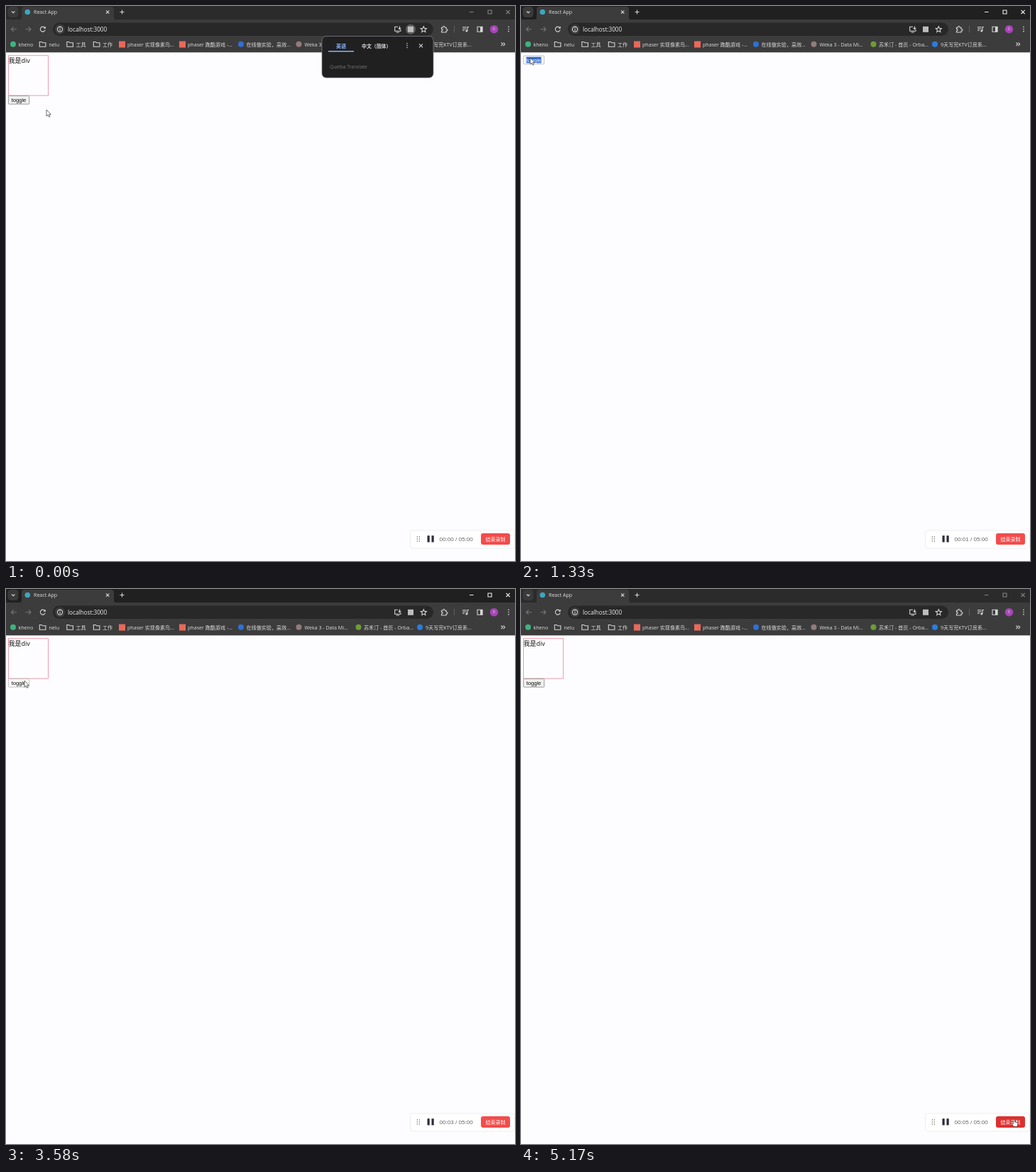
Recreate the animation shown at these times as an HTML page. Size 717 by 781 pixels, loop 5.26 s.

```html
<!DOCTYPE html>
<html lang="zh">
<head>
<meta charset="utf-8">
<title>React App</title>
<style>
  html, body { margin: 0; width: 100%; height: 100%; overflow: hidden; background: #fdfdff; }
  svg { display: block; width: 717px; height: 781px; }
  text { font: 7.1px "Open Sans", "Noto Sans CJK SC", "Noto Sans CJK", sans-serif; fill: #dedede; white-space: pre; }
  .line { fill: none; stroke: #d4d4d4; stroke-width: 1.1; }
  .dim { stroke: #777; }
  .arial { font-family: "Liberation Sans", Arial, sans-serif; }
</style>
</head>
<body>
<svg viewBox="0 0 717 781">
  <!-- tab strip -->
  <rect id="strip" width="717" height="20"/>
  <rect x="2.5" y="1" width="15" height="15" rx="4.5" fill="#3a3a3b"/>
  <path class="line" d="M8 7.5l2.2 2.2 2.2-2.2"/>
  <path d="M18 19.5q4 0 4-4V5q0-4 4-4h122q4 0 4 4v10.500q0 4 4 4z" fill="#3c3c3d"/>
  <circle cx="30.300" cy="8.500" r="3.800" fill="#3fa5bd"/>
  <text x="39" y="11">React App</text>
  <path class="line" d="M141 6.300l4.400 4.400m0-4.400l-4.400 4.400M160.500 8.500h6m-3-3v6"/>
  <path id="winButtons" class="line" d="M653 8.500h5.500M679 6h5v5h-5zM704.500 5.800l5.200 5.200m0-5.200l-5.200 5.200"/>

  <!-- toolbar -->
  <rect y="19" width="717" height="46.300" fill="#3c3c3d"/>
  <path class="line dim" d="M15 32.700H7.500m3.200-3.200l-3.200 3.200 3.200 3.200M27.500 32.700H35m-3.200-3.200l3.200 3.200-3.200 3.200"/>
  <path class="line" d="M54.600 30.400a3.500 3.500 0 1 0 .6 3.300M55.300 29v2.300H53"/>
  <rect x="66" y="23.500" width="536" height="18.500" rx="9.250" fill="#282829"/>
  <circle cx="76" cy="32.700" r="7" fill="#3c3c3d"/>
  <circle class="line" cx="76" cy="32.700" r="3.600"/>
  <path class="line" d="M76 32.200v2.600M76 30.300v1"/>
  <text x="87" y="35.700" style="font-size:8.200px;fill:#eee">localhost:3000</text>
  <path class="line" d="M552 29.300h-4.300v6h8.300v-2M549.500 37h4.500M554.500 28.500v4m-1.800-1.700l1.800 1.800 1.800-1.800"/>
  <circle id="halo" cx="570" cy="32.800" r="7" fill="#5d5d5e"/>
  <rect x="566" y="28.800" width="8" height="8" fill="#bdbdbd"/>
  <path class="line" d="M588.300 28.700l1.200 2.700 2.900.3-2.200 2 .6 2.900-2.500-1.500-2.500 1.500.6-2.900-2.200-2 2.900-.3z"/>
  <path class="line" d="M613.500 30.300h2q0-2 1.300-2t1.300 2h2v2.200q2 0 2 1.300t-2 1.300v1.900h-6.600v-2q1.700-.2 1.700-1.300t-1.700-1.300z"/>
  <path d="M631.500 28v9.500" stroke="#606062"/>
  <path class="line" d="M643 29.700h5.500M643 32h5.500M643 34.300h3M650 35v-5.500h2"/>
  <circle cx="648.800" cy="35" r="1.500" fill="#d4d4d4"/>
  <path class="line" d="M664 29.200h7v7h-7z"/>
  <path d="M668 29h3.300v7.500H668z" fill="#d4d4d4"/>
  <circle cx="687.500" cy="32.700" r="5.800" fill="#a844b8"/>
  <text x="687.500" y="34.400" text-anchor="middle" style="font-size:4.800px">D</text>
  <path d="M708 29.300v8" stroke="#d4d4d4" stroke-width="1.700" stroke-dasharray="0 3.200" stroke-linecap="round"/>
  <g id="bookmarks"></g>
  <path class="line" d="M697.500 51.500l2.200 2.300-2.200 2.300m3-4.600l2.200 2.300-2.200 2.300"/>

  <!-- page -->
  <g id="box">
    <rect x="3.500" y="69.700" width="56" height="56.300" fill="none" stroke="#ea93a3" stroke-width=".9"/>
    <text x="3.500" y="79.800" style="font-size:9px;fill:#111">我是div</text>
  </g>
  <g id="toggle">
    <rect id="face" x="3.400" y="70" width="29.300" height="11.800" rx="1.200" stroke-width=".8"/>
    <rect id="mark" x="7.500" y="71.700" width="21" height="8.600" fill="#2e68cf"/>
    <text id="label" class="arial" x="18" y="78.500" text-anchor="middle" style="font-size:7.600px">toggle</text>
  </g>

  <!-- translate bubble -->
  <g id="bubble">
    <rect x="445" y="42.500" width="157" height="58.500" rx="6" fill="#202021" stroke="#8d8798" stroke-width=".7"/>
    <text x="465" y="58.700" style="fill:#8ab4f8;font-weight:bold">英语</text>
    <text x="501" y="58.700" style="font-size:6.900px;font-weight:bold">中文（简体）</text>
    <path d="M454 63.700h36" stroke="#8ab4f8" stroke-width="1.400"/>
    <path d="M565 52.700v7" stroke="#d4d4d4" stroke-width="1.600" stroke-dasharray="0 2.900" stroke-linecap="round"/>
    <path class="line" d="M582 53.300l5 5m0-5l-5 5"/>
    <text x="456" y="87.800" style="font-size:6.700px;fill:#757577">Quelba Translate</text>
  </g>

  <!-- recorder -->
  <rect x="569.500" y="738" width="147" height="25" rx="3" fill="#fff" stroke="#eeeef3"/>
  <path d="M579.300 747v7M582.300 747v7" stroke="#555" stroke-width="1.300" stroke-dasharray="0 3" stroke-linecap="round"/>
  <path d="M593.500 745.300h3.200v9.200h-3.200zM599.500 745.300h3.200v9.200h-3.200z" fill="#2b2b3a"/>
  <text id="clock" class="arial" x="610.500" y="753" style="font-size:8.100px;fill:#666"></text>
  <rect id="stop" x="669" y="742" width="41" height="16" rx="3"/>
  <text x="675.500" y="752.600" style="font-size:7px;fill:#fff">结束录制</text>

  <path id="arrow" d="M0 0V9L2.100 7.200 3.500 10.200 5 9.500 3.600 6.600H6.300Z" fill="#fff" stroke="#333" stroke-width=".7"/>
  <path id="hand" d="M-.9 1q.9-1.500 1.800 0v3l3.400.9q1 .4.8 1.700L4.500 10.500H-.3L-3 6.800q.2-1.300 2.100 0z" fill="#fff" stroke="#333" stroke-width=".6"/>
</svg>
<script>
const $ = id => document.getElementById(id);
const show = (id, on) => $(id).setAttribute('visibility', on ? 'visible' : 'hidden');
const set = (id, attrs) => { for (const k in attrs) $(id).setAttribute(k, attrs[k]); };
const within = (t, a, b) => t >= a && t < b;

// icon x, icon kind, icon colour, text x, text
const links = [
  [10, 'dot', '#3fb27f', 17.5, 'kheno'],
  [51.5, 'folder', '', 60.5, 'nelu'],
  [90, 'folder', '', 98.500, '工具'],
  [127.500, 'folder', '', 136, '工作'],
  [163.500, 'square', '#e8695a', 171, 'phaser 实现像素鸟...'],
  [248.500, 'square', '#e8695a', 256, 'phaser 跑酷游戏 -...'],
  [331, 'dot', '#2f70d2', 338.500, '在线做实验，高效...'],
  [412.500, 'dot', '#927b7b', 420.500, 'Weka 3 - Data Mi...'],
  [496.500, 'dot', '#6f9c35', 504, '苏禾汀 - 首页 - Orba...'],
  [583, 'dot', '#2b7de0', 591, '9天写完KTV订房系...']
];
const icons = {
  dot: (x, c) => `<circle cx="${x}" cy="53.800" r="4" fill="${c}"/>`,
  square: (x, c) => `<rect x="${x - 4.5}" y="49.500" width="9" height="9" fill="${c}"/>`,
  folder: x => `<path class="line" d="M${x - 4.2} 50.500h3l1.200 1.300h4.400v5.400h-8.600z"/>`
};
$('bookmarks').innerHTML = links.map(([x, kind, colour, tx, name]) =>
  icons[kind](x, colour) + `<text x="${tx}" y="56.500">${name}</text>`).join('');

// pointer path: time, x, y
const path = [
  [0, 57, 146], [80, 57, 146], [400, 28, 132.500], [670, 28, 132.500],
  [1080, 13, 73], [1420, 13, 73], [1750, 30, 162], [1830, 30, 162],
  [2250, 26, 126], [2480, 23, 131], [2580, 23, 131], [2900, 20, 75],
  [3080, 20, 75], [3480, 26, 129], [3670, 26, 129], [3920, 22, 75],
  [4080, 22, 75], [4650, 667, 683], [4700, 667, 683], [5050, 694.500, 746], [5260, 694.500, 746]
];
const clicks = [500, 1420, 2500, 3080, 3670, 4000];
const LOOP = 5260, STEP = 1000 / 12;

function pointer(t) {
  const i = path.findIndex(p => p[0] > t);
  const [t0, x0, y0] = path[i - 1], [t1, x1, y1] = path[i];
  const u = (t - t0) / (t1 - t0), e = u * u * (3 - 2 * u);
  return [x0 + (x1 - x0) * e, y0 + (y1 - y0) * e];
}

function draw() {
  const t = Math.floor((performance.now() % LOOP + 3.4) / STEP) * STEP + 4;
  const [x, y] = pointer(Math.min(t, LOOP - 1));
  const open = clicks.filter(c => t >= c).length % 2 === 0;
  const active = within(t, 420, 5080);
  const pressed = clicks.some(c => within(t, c - 90, c));
  const selected = within(t, 1080, 1420);
  const top = open ? 126.300 : 70;
  const hover = x > 3 && x < 33 && y > top && y < top + 12;
  const onStop = x > 669 && x < 710 && y > 742 && y < 758;

  set('strip', { fill: active ? '#202020' : '#2b2b2c' });
  $('winButtons').style.stroke = active ? '#eee' : '#85857f';

  const fade = Math.max(0, Math.min(1, (t - 400) / 225));
  const size = 1 - .05 * fade;
  set('bubble', {
    opacity: 1 - fade,
    transform: `translate(523.500 72) scale(${size}) translate(-523.500 -72)`
  });
  set('halo', { opacity: Math.max(0, Math.min(1, (1300 - t) / 400)) });

  show('box', open);
  set('toggle', { transform: `translate(0 ${top - 70})` });
  set('face', {
    fill: pressed ? '#f7f7f7' : hover ? '#e6e6e6' : '#efefef',
    stroke: pressed ? '#b5b5b5' : hover ? '#666' : '#858585'
  });
  show('mark', selected);
  $('label').style.fill = selected ? '#fff' : '#111';

  $('clock').textContent = `00:0${Math.floor(Math.max(0, t - 40) / 1000)} / 05:00`;
  set('stop', { fill: onStop ? '#dc3030' : '#f24c4c' });
  show('arrow', !onStop);
  show('hand', onStop);
  set(onStop ? 'hand' : 'arrow', { transform: `translate(${x} ${y})` });
  requestAnimationFrame(draw);
}
draw();
</script>
</body>
</html>
```
